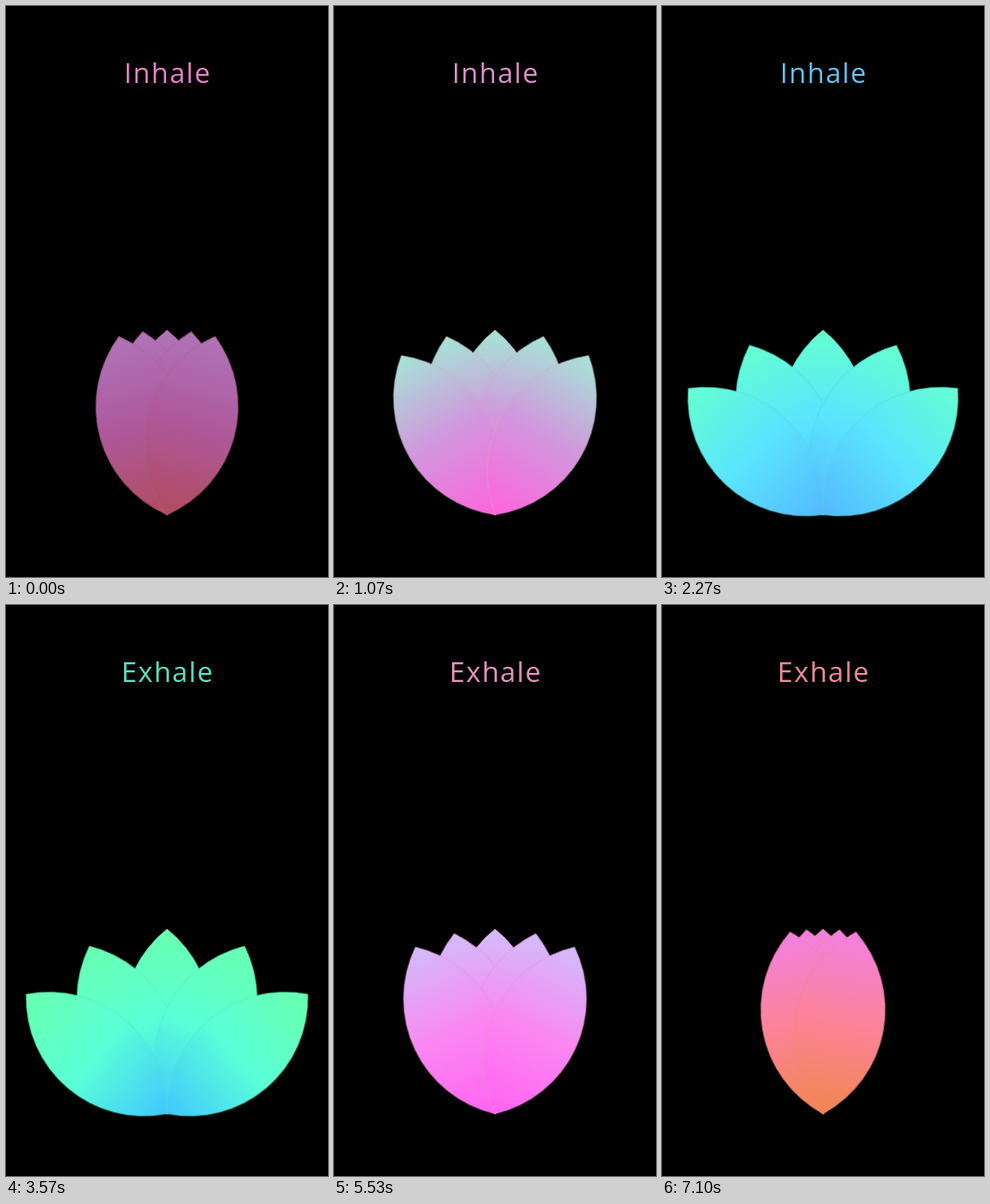
Animation of 360x638 px, one loop 7130 ms. Source, as an HTML page:

```html
<!DOCTYPE html>
<html lang="en">
<head>
<meta charset="utf-8">
<title>Breathing lotus</title>
<style>
  html, body { margin: 0; width: 100%; height: 100%; overflow: hidden; background: #000; }
  svg { display: block; width: 100vw; height: 100vh; }
  #words {
    font: 500 31px "Open Sans", "Noto Sans", sans-serif;
    letter-spacing: 1.4px;
    text-anchor: middle;
  }
  #flower { fill: url(#petalFill); stroke-width: 1; stroke-opacity: .55; stroke-linejoin: round; }
  #inhale, #exhale { animation: show 7130ms step-end infinite; }
  #exhale { animation-name: hide; }
  @keyframes show { 0% { opacity: 1 } 44.18%, 100% { opacity: 0 } }
  @keyframes hide { 0% { opacity: 0 } 44.18%, 100% { opacity: 1 } }
</style>
</head>
<body>
<svg viewBox="0 0 360 638">
  <defs>
    <linearGradient id="petalFill" x1="0" y1="1" x2="0" y2="0">
      <stop offset="0"/><stop offset=".5"/><stop offset="1"/>
    </linearGradient>
    <path id="petal" d="M0 0A132 132 0 0 1 0-206.5A132 132 0 0 1 0 0Z"/>
  </defs>
  <g id="words">
    <text id="inhale" x="180.8" y="85.5">Inhale</text>
    <text id="exhale" x="180.8" y="85.5">Exhale</text>
  </g>
  <g id="flower" transform="translate(180 568.5)">
    <use href="#petal"/>
    <use href="#petal" data-spread="-.5"/>
    <use href="#petal" data-spread=".5"/>
    <use href="#petal" data-spread="-1"/>
    <use href="#petal" data-spread="1"/>
  </g>
</svg>
<script>
  const LOOP = 7130, PEAK = 3150;
  const timing = { duration: LOOP, iterations: Infinity };

  // Outer petals open from 15.1 to 50.5 degrees, then close to 10.2.
  for (const petal of document.querySelectorAll('[data-spread]')) {
    const turn = deg => `rotate(${deg * petal.dataset.spread}deg)`;
    petal.animate([
      { transform: turn(15.1), offset: 0, easing: 'cubic-bezier(.341,.308,.566,1)' },
      { transform: turn(50.5), offset: PEAK / LOOP, easing: 'cubic-bezier(.424,0,.596,.925)' },
      { transform: turn(10.2), offset: 1 }
    ], timing);
  }

  const times = [0, 1070, 2270, 3570, 4570, 5530, LOOP];
  function tint(el, prop, colors) {
    el.animate(colors.split(' ').map((c, i) => ({ [prop]: '#' + c, offset: times[i] / LOOP })), timing);
  }

  const [base, middle, tip] = document.querySelectorAll('#petalFill stop');
  tint(base, 'stopColor', 'b24b5f ff64dc 55b9ff 41c8ff 96a0f5 ff64f0 f0874b');
  tint(middle, 'stopColor', 'ae589b d296de 5ae4ff 5affd7 78cdfa fa87f2 fc8396');
  tint(tip, 'stopColor', 'b073b9 a5e4d6 64ffd0 69ffaf 61ffe8 d2bcfa f27fe1');

  tint(document.getElementById('words'), 'fill', 'e682c8 dc91c8 64c3eb 5ae1c8 64d7be e691be ee8a96');
  tint(document.getElementById('flower'), 'stroke', 'a56478 cdaabe 55d7cd 55e6b4 69d7c3 e196c3 eb828c');
</script>
</body>
</html>
```
